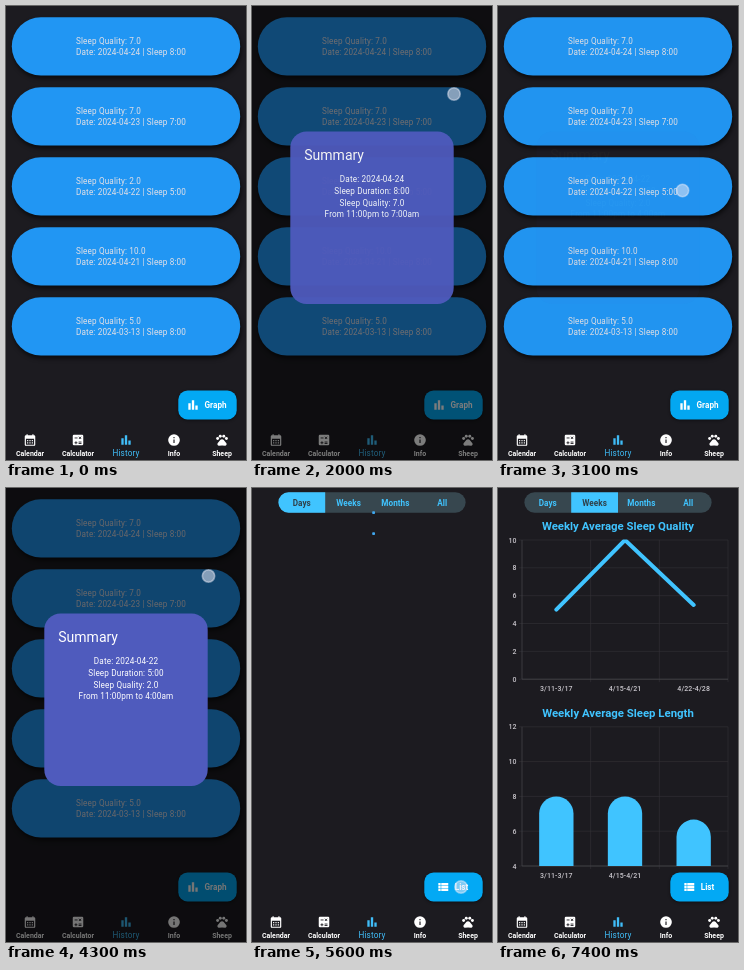
Recreate the animation shown at these times as an HTML page. Size 240 by 454 pixels, loop 8000 ms.

```html
<!DOCTYPE html>
<html lang="en">
<head>
<meta charset="utf-8">
<title>Sleep history</title>
<style>
html, body { margin: 0; width: 100%; height: 100%; overflow: hidden; background: #1c1b20; }
svg { display: block; width: 100vw; height: 100vh; font: 400 8.17px Roboto, sans-serif; letter-spacing: .146px; }
.anim { animation: 8s linear infinite; }
.step { animation-timing-function: step-end; }
.card rect { fill: #2196f3; filter: drop-shadow(1.5px 3px 2px #0009); }
.card text { fill: #e6e1e5; }
.mid { text-anchor: middle; }
.bold { font-weight: 700; letter-spacing: .05px; }
.nav { font-size: 7px; font-weight: 600; letter-spacing: 0; fill: #fff; }
.nav .on { font-size: 8.17px; font-weight: 400; letter-spacing: .146px; fill: #40bdf8; }
.fab rect { fill: #03a9f4; filter: drop-shadow(0 1.5px 1.5px #0007); }
.fab { fill: #fff; }
.title { font-size: 11.4px; font-weight: 700; letter-spacing: 0; fill: #40c4ff; }
.tick { font-size: 7px; font-weight: 500; letter-spacing: .1px; fill: #c9c6cc; }
.grid { stroke: #343338; stroke-width: .6; fill: none; }
.axis { stroke: #4a494e; stroke-width: .7; fill: none; }
.line { stroke: #40c4ff; stroke-width: 4; stroke-linecap: round; stroke-linejoin: round; fill: none; stroke-dasharray: 1 2; }
.bar { fill: #40c4ff; transform-box: fill-box; }
.touch { opacity: 0; }

#list { animation-name: list; }
#graph { animation-name: graph; }
#dots { animation-name: dots; }
#days { animation-name: days; }
#weeks { animation-name: weeks; }
#selDays { animation-name: selDays; }
#selWeeks { animation-name: weeks; }
#scrim { animation-name: scrim; }
#dlg1 { animation-name: dlg1; }
#dlg2 { animation-name: dlg2; }
#days .line { animation-name: drawDays; }
#weeks .line { animation-name: drawWeeks; }
#days .bar { animation-name: growDays; }
#weeks .bar { animation-name: growWeeks; }

@keyframes list { 0% { visibility: visible } 69.9%, 100% { visibility: hidden } }
@keyframes graph { 0% { visibility: hidden } 69.9%, 100% { visibility: visible } }
@keyframes dots { 0% { opacity: 0 } 69.9% { opacity: 1 } 71.1%, 100% { opacity: 0 } }
@keyframes days { 0% { opacity: 0 } 71.1% { opacity: 1 } 87.4%, 100% { opacity: 0 } }
@keyframes weeks { 0% { opacity: 0 } 87.4%, 100% { opacity: 1 } }
@keyframes selDays { 0% { opacity: 1 } 87.4%, 100% { opacity: 0 } }
@keyframes scrim {
  0%, 10% { opacity: 0 } 12.5%, 24.9% { opacity: 1 } 27.3%, 38.7% { opacity: 0 }
  41.2%, 54.9% { opacity: 1 } 57.3%, 100% { opacity: 0 }
}
@keyframes dlg1 { 0%, 10% { opacity: 0 } 12.5%, 24.9% { opacity: 1 } 27.3%, 100% { opacity: 0 } }
@keyframes dlg2 { 0%, 38.7% { opacity: 0 } 41.2%, 54.9% { opacity: 1 } 57.3%, 100% { opacity: 0 } }
@keyframes drawDays { 0%, 71.1% { stroke-dashoffset: 1; animation-timing-function: ease-out } 76.2%, 100% { stroke-dashoffset: 0 } }
@keyframes drawWeeks { 0%, 87.4% { stroke-dashoffset: 1; animation-timing-function: ease-out } 92.4%, 100% { stroke-dashoffset: 0 } }
@keyframes growDays { 0%, 71.1% { transform: translateY(100%); animation-timing-function: ease-out } 76.2%, 100% { transform: none } }
@keyframes growWeeks { 0%, 87.4% { transform: translateY(100%); animation-timing-function: ease-out } 92.4%, 100% { transform: none } }
@keyframes tap1 { 0%, 6.9% { opacity: 0 } 7.4%, 10.5% { opacity: 1 } 14%, 100% { opacity: 0 } }
@keyframes tap2 { 0%, 22.3% { opacity: 0 } 22.45%, 25% { opacity: 1 } 27%, 100% { opacity: 0 } }
@keyframes tap3 { 0%, 36% { opacity: 0 } 36.2%, 39.2% { opacity: 1 } 43%, 100% { opacity: 0 } }
@keyframes tap4 { 0%, 53.5% { opacity: 0 } 53.7%, 55.2% { opacity: 1 } 57.2%, 100% { opacity: 0 } }
@keyframes tap5 { 0%, 68.5% { opacity: 0 } 68.7%, 70.4% { opacity: 1 } 73%, 100% { opacity: 0 } }
@keyframes tap6 { 0%, 86% { opacity: 0 } 86.2%, 88% { opacity: 1 } 91%, 100% { opacity: 0 } }
</style>
</head>
<body>
<svg id="stage" viewBox="0 0 240 454" preserveAspectRatio="none">
  <defs>
    <clipPath id="topPlot"><rect x="24" y="51.5" width="206" height="141"/></clipPath>
    <clipPath id="lowPlot"><rect x="24" y="239" width="206" height="139"/></clipPath>
    <path id="iCal" d="M19 4h-1V2h-2v2H8V2H6v2H5Q3 4 3 6V20Q3 22 5 22H19Q21 22 21 20V6Q21 4 19 4zM19 20H5V10H19zM7 12h2v2H7zm4 0h2v2h-2zm4 0h2v2h-2zM7 16h2v2H7zm4 0h2v2h-2zm4 0h2v2h-2z" fill-rule="evenodd"/>
    <g id="iCalc">
      <rect x="3" y="3" width="18" height="18" rx="2"/>
      <path d="M6.2 8.5h5M13 15.5h5M13 18h5M6 16.7h5M8.5 14.2v5M13.6 6.4l3.8 3.8M17.4 6.4l-3.8 3.8" stroke="#1c1b20" stroke-width="1.5"/>
    </g>
    <path id="iBars" d="M4 9h4v11H4zm6-5h4v16h-4zm6 9h4v7h-4z"/>
    <path id="iInfo" d="M2 12a10 10 0 0 1 20 0a10 10 0 0 1-20 0zM11 11v6h2v-6zM11 7v2h2V7z" fill-rule="evenodd"/>
    <g id="iPaw">
      <circle cx="4.5" cy="9.5" r="2.5"/><circle cx="9" cy="5.5" r="2.5"/>
      <circle cx="15" cy="5.5" r="2.5"/><circle cx="19.5" cy="9.5" r="2.5"/>
      <path d="M12 10.5Q13.8 10.5 15 12L17.4 14.9Q20.5 17.5 19.9 19.7Q19 22 17.2 22L12 21.5L6.8 22Q5 22 4.1 19.7Q3.5 17.5 6.6 14.9L9 12Q10.2 10.5 12 10.5z"/>
    </g>
    <path id="iRows" d="M4 5h4v4H4zm5 0h12v4H9zM4 10h4v4H4zm5 0h12v4H9zM4 15h4v4H4zm5 0h12v4H9z"/>
  </defs>
</svg>
<script>
const stage = document.getElementById('stage');
const text = (x, y, s, cls = '', extra = '') => `<text x="${x}" y="${y}" class="${cls}" ${extra}>${s}</text>`;
const icon = (id, x, y) => `<use href="#${id}" transform="translate(${x} ${y}) scale(.584)"/>`;
const fab = (id, ix, label, tx) =>
  `<g class="fab"><rect x="172.3" y="384.5" width="58.4" height="29" rx="9.3"/>${icon(id, ix, 392)}${text(tx, 402, label, 'bold')}</g>`;

// History cards
const nights = [
  ['7.0', '2024-04-24', 8], ['7.0', '2024-04-23', 7], ['2.0', '2024-04-22', 5],
  ['10.0', '2024-04-21', 8], ['5.0', '2024-03-13', 8]
];
const card = ([q, date, h], i) => `<g class="card" transform="translate(0 ${i * 70})">
  <rect x="5.8" y="11.3" width="228.4" height="58.2" rx="29.1"/>
  ${text(70, 37.8, 'Sleep Quality: ' + q)}${text(70, 49.3, `Date: ${date} | Sleep ${h}:00`)}</g>`;
const list = `<g id="list" class="anim step">${nights.map(card).join('')}${fab('iBars', 180, 'Graph', 198.5)}</g>`;

// Charts
const L = 24, R = 230;
function frame(title, titleY, top, bottom, min, max, labels) {
  const step = (R - L) / labels.length;
  let s = text(120, titleY, title, 'title mid'), d = '';
  for (let v = min; v <= max; v += 2) {
    const y = bottom - (v - min) / (max - min) * (bottom - top);
    d += `M${L - 3} ${y}H${R}`;
    s += text(18.7, y + 2.5, v, 'tick', 'text-anchor="end"');
  }
  labels.forEach((t, i) => {
    d += `M${L + (i + 1) * step} ${top}V${bottom + 3}`;
    s += text(L + (i + .5) * step, bottom + 12, t, 'tick mid');
  });
  return `<path class="grid" d="${d}"/><path class="axis" d="M${L} ${top}V${bottom}H${R}"/>` + s;
}
function charts(id, name, rows) {
  const labels = rows.map(r => r[0]), step = (R - L) / rows.length;
  const pts = rows.map((r, i) => `${L + (i + .5) * step} ${191.2 - r[1] * 13.92}`);
  const bars = rows.map((r, i) => {
    const h = (r[2] - 4) * 17.4, w = step / 2, x = L + (i + .5) * step - w / 2, a = w / 2;
    return `<path class="bar anim" d="M${x} 378V${378 - h + a}a${a} ${a} 0 0 1 ${w} 0V378z"/>`;
  });
  return `<g id="${id}" class="anim step">
    ${frame(name + ' Sleep Quality', 42, 52, 191.2, 0, 10, labels)}
    <g clip-path="url(#topPlot)"><path class="line anim" pathLength="1" d="M${pts.join('L')}"/></g>
    ${frame(name + ' Sleep Length', 229, 238.8, 378, 4, 12, labels)}
    <g clip-path="url(#lowPlot)">${bars.join('')}</g></g>`;
}
const daily = nights.slice().reverse().map(([q, d, h]) => [`${+d.slice(5, 7)}/${d.slice(8)}`, +q, h]);
const weekly = [['3/11-3/17', 5, 8], ['4/15-4/21', 10, 8], ['4/22-4/28', 16 / 3, 20 / 3]];

// Range selector
const ranges = ['Days', 'Weeks', 'Months', 'All'];
const segText = (i, fill) => text(49.8 + i * 46.8, 17.7, ranges[i], 'bold mid', `fill="${fill}"`);
const selector = `<rect x="26.4" y="4.3" width="187.2" height="20.4" rx="10.2" fill="#37474f"/>
  ${ranges.map((_, i) => segText(i, '#40c4ff')).join('')}
  <g id="selDays" class="anim step"><path d="M73.2 4.3H36.6a10.2 10.2 0 0 0 0 20.4H73.2z" fill="#40c4ff"/>${segText(0, '#2f3f48')}</g>
  <g id="selWeeks" class="anim step"><rect x="73.2" y="4.3" width="46.8" height="20.4" fill="#40c4ff"/>${segText(1, '#2f3f48')}</g>`;
const graph = `<g id="graph" class="anim step">
  ${charts('days', 'Daily', daily)}${charts('weeks', 'Weekly Average', weekly)}${selector}
  <g id="dots" class="anim step" fill="#40a8f0"><rect x="120.2" y="23.2" width="2.8" height="2.8" rx=".8"/><rect x="120.2" y="44.2" width="2.8" height="2.8" rx=".8"/></g>
  ${fab('iRows', 184, 'List', 202.7)}</g>`;

// Bottom navigation
const tabs = [['iCal', 'Calendar'], ['iCalc', 'Calculator'], ['iBars', 'History'], ['iInfo', 'Info'], ['iPaw', 'Sheep']];
const nav = '<g class="nav">' + tabs.map(([id, label], i) => {
  const x = 24 + i * 48, on = i === 2;
  return `<g class="${on ? 'on' : ''}">${icon(id, x - 7, 427)}${text(x, 450, label, 'mid')}</g>`;
}).join('') + '</g>';

// Summary dialog
const dialog = (id, [q, date, h], end) => `<g id="${id}" class="anim" fill="#fff">
  <rect x="38.3" y="125.5" width="163.4" height="172.5" rx="16.3" fill="#4f5bbd"/>
  ${text(52.3, 154, 'Summary', '', 'style="font-size:14px;letter-spacing:0"')}
  ${['Date: ' + date, `Sleep Duration: ${h}:00`, 'Sleep Quality: ' + q, `From 11:00pm to ${end}:00am`]
    .map((s, i) => text(120, 176.3 + i * 11.67, s, 'mid')).join('')}</g>`;

const taps = [[184, 45], [202, 88], [184.5, 184.5], [202.5, 88], [209, 399], [97, 15]];
const touch = ([x, y], i) => `<g class="touch anim" style="animation-name:tap${i + 1}">
  <circle cx="${x}" cy="${y}" r="6.2" fill="#e8e8f4" fill-opacity=".55" stroke="#f0f0fa" stroke-opacity=".45" stroke-width="1.6"/></g>`;

stage.insertAdjacentHTML('beforeend', '<rect width="240" height="454" fill="#1c1b20"/>' + list + graph + nav +
  '<rect id="scrim" class="anim" width="240" height="454" fill="#000" fill-opacity=".54"/>' +
  dialog('dlg1', nights[0], 7) + dialog('dlg2', nights[2], 4) + taps.map(touch).join(''));
</script>
</body>
</html>
```
